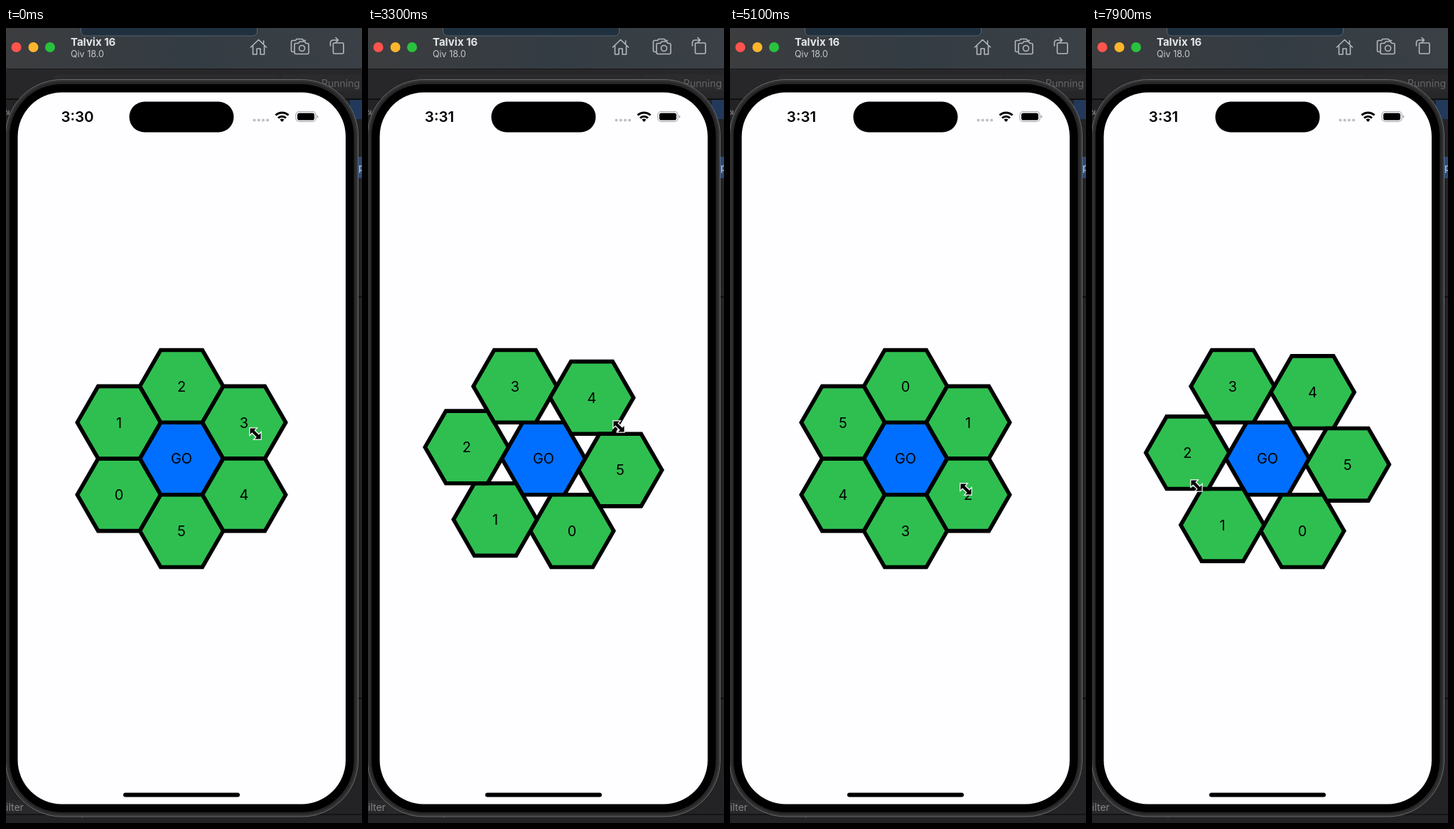
Recreate the animation shown at these times as an HTML page. Size 501 by 1117 pixels, loop 8 s.

```html
<!DOCTYPE html>
<html lang="en">
<head>
<meta charset="utf-8">
<title>Hexagon ring</title>
<style>
  html, body { margin: 0; width: 100%; height: 100%; overflow: hidden; background: #242426; }
  svg { display: block; width: 501px; height: 1117px; font-family: Inter, "Liberation Sans", sans-serif; }
  .hex path { stroke: #000; stroke-width: 5.6; fill: #2fbf50; }
  .hex text { font-size: 20px; text-anchor: middle; }
  .hex.go path { fill: #006fff; }
  .icon { fill: none; stroke: #b4b8bc; stroke-width: 1.6; stroke-linejoin: round; stroke-linecap: round; }
</style>
</head>
<body>
<svg viewBox="0 0 501 1117">
  <defs>
    <linearGradient id="bar">
      <stop offset="0" stop-color="#3c3d3f"/>
      <stop offset=".5" stop-color="#343c43"/>
      <stop offset="1" stop-color="#3a4045"/>
    </linearGradient>
  </defs>

  <!-- window behind the device -->
  <rect width="501" height="1117" fill="#232325"/>
  <rect y="57" width="501" height="43" fill="#272729"/>
  <rect x="68" y="65" width="317" height="24" rx="5" fill="#2b2b2d"/>
  <rect x="387" y="65" width="130" height="24" rx="5" fill="#2b2b2d"/>
  <rect y="99" width="501" height="2" fill="#101011"/>
  <rect x="484" y="101" width="17" height="27" fill="#22395c"/>
  <rect x="495" y="181" width="6" height="30" fill="#2b4a7a"/>
  <path d="M495 378h6M495 942h6M0 187h6M0 998h6" stroke="#0e0e0f" stroke-width="2"/>
  <path d="M-2 113l6 8M4 116v5h-5" class="icon" style="stroke:#6a6a6c"/>
  <rect y="1085" width="106" height="20" fill="#29292b"/>
  <path d="M0 1105h501" stroke="#151516" stroke-width="2"/>
  <path d="M107 1103v7" stroke="#3a3a3c" stroke-width="2"/>
  <g font-size="14" fill="#656567">
    <text x="444" y="82.500">Running A</text>
    <text x="0" y="1099.500" fill="#858587">ilter</text>
    <text x="496" y="201" fill="#c6cedb">p</text>
  </g>

  <!-- title bar -->
  <rect width="501" height="57" fill="url(#bar)"/>
  <path d="M0 57.500h501" stroke="#17181a"/>
  <path d="M105.500-1v5q0 7 7 7h234q7 0 7-7v-5z" fill="#20303f" stroke="#59636c"/>
  <circle cx="14.500" cy="27" r="7" fill="#ff544d"/>
  <circle cx="38.500" cy="27" r="7" fill="#fdb52c"/>
  <circle cx="62" cy="27" r="7" fill="#29c23e"/>
  <text x="91" y="24.500" font-size="15" font-weight="700" fill="#e4e6e8">Talvix 16</text>
  <text x="91" y="41" font-size="12.500" fill="#c3c7ca">Qiv 18.0</text>
  <g class="icon">
    <path d="M344.500 27l11-10.500 11 10.500M347.500 25v12h5.500v-8h5v8h5.500v-12M362.500 22v-4"/>
    <path d="M405 33.500h-1.500q-2 0-2-2v-12q0-2 2-2h4l1.500-2h8l1.500 2h3"/>
    <path d="M408 21.500h3.500l2-2.500h6.500l2 2.500h2q2 0 2 2v11q0 2-2 2h-16q-2 0-2-2v-11q0-2 2-2z"/>
    <circle cx="416.500" cy="28.500" r="4"/>
    <rect x="460.500" y="21" width="14.500" height="15" rx="1.500"/>
    <path d="M456.500 25v-4q0-4 4-4h6M464 13.500l3.500 3.500-3.500 3.500"/>
  </g>

  <!-- device -->
  <rect x="-.5" y="72.500" width="496" height="1035.500" rx="79" fill="#262627" stroke="#6e6f70"/>
  <rect x="1.500" y="74.500" width="492" height="1031.500" rx="77" fill="none" stroke="#343536" stroke-width="2"/>
  <rect x="5" y="79" width="484.500" height="1023" rx="73"/>
  <rect x="16.500" y="90.500" width="461.500" height="1000" rx="62" fill="#fefdff"/>
  <rect x="173.500" y="103.500" width="147" height="43" rx="21.500"/>
  <rect x="165" y="1074.500" width="164" height="6" rx="3"/>
  <text id="clock" x="100.500" y="132" font-size="20.500" font-weight="600" text-anchor="middle">3:30</text>
  <path d="M349.500 129.500h20" stroke="#c1c0c4" stroke-width="4.200" stroke-linecap="round" stroke-dasharray="0 6.200"/>
  <g fill="none" stroke="#000" stroke-width="3">
    <path d="M379.500 122.500a13 13 0 0 1 18 0M383 126.500a8 8 0 0 1 11 0"/>
  </g>
  <path d="M388.500 132l-3-3.200a4.500 4.500 0 0 1 6 0z"/>
  <rect x="408" y="117.500" width="28" height="14" rx="4.500" fill="none" stroke="#a4a3a7" stroke-width="1.200"/>
  <rect x="410" y="119.500" width="24" height="10" rx="2.800"/>
  <path d="M437.500 122.500q2 .5 2 2t-2 2z" fill="#a4a3a7"/>

  <g id="ring"></g>
  <path id="cursor" d="M-7.500-7.500H1L-1.700-4.800 4.800 1.700 7.500-1V7.500H-1L1.700 4.800-4.800-1.700-7.500 1z"
        stroke="#fff" stroke-width="2.400" paint-order="stroke"/>
</svg>
<script>
const LOOP = 8000, TICK = 100, TURN = 800;
const CX = 247, CY = 605, R = 58.67;
const rad = Math.PI / 180;
const byId = id => document.getElementById(id);
const lerp = (a, b, f) => a + (b - a) * f;
const clamp = x => Math.min(1, Math.max(0, x));
const ease = x => (1 - Math.cos(Math.PI * clamp(x))) / 2;

// A tap brings the tapped tile to the top: [start, slots counterclockwise]
const turns = [[1095, 1], [2982, 1], [4211, 2], [5761, -1], [7342, -2]];

// Pointer moves: [start, end, x, y]
const moves = [
  [0, 200, 353, 560],
  [3700, 4100, 332, 648],
  [5100, 5700, 165, 550],
  [6500, 7100, 147, 643]
];

const corner = (r, deg) => [r * Math.cos(deg * rad), -r * Math.sin(deg * rad)];
const outline = 'M' + [0, 60, 120, 180, 240, 300].map(a => corner(R, a)).join('L') + 'z';

function addHex(label, kind) {
  const g = document.createElementNS('http://www.w3.org/2000/svg', 'g');
  g.setAttribute('class', 'hex ' + kind);
  g.innerHTML = `<path d="${outline}"/><text y="7.3">${label}</text>`;
  byId('ring').append(g);
  return g;
}

const place = (el, x, y) => el.setAttribute('transform', `translate(${x} ${y})`);

// Tiles slide along a hexagon of radius 2R; slot 0 is the middle of its top edge
function ringPoint(slot) {
  const q = slot - 0.5, side = Math.floor(q);
  const a = corner(2 * R, 120 + 60 * side), b = corner(2 * R, 180 + 60 * side);
  return [CX + lerp(a[0], b[0], q - side), CY + lerp(a[1], b[1], q - side)];
}

place(addHex('GO', 'go'), CX, CY);
const tiles = [0, 1, 2, 3, 4, 5].map(n => addHex(n, 'tile'));

function draw(t) {
  const shift = turns.reduce((s, [start, n]) => s + n * ease((t - start) / TURN), 0);
  tiles.forEach((el, n) => place(el, ...ringPoint(2 - n + shift)));

  let x = 351, y = 570;
  for (const [start, end, tx, ty] of moves) {
    const f = ease((t - start) / (end - start));
    x = lerp(x, tx, f);
    y = lerp(y, ty, f);
  }
  place(byId('cursor'), x, y);
  byId('clock').textContent = t < 2200 ? '3:30' : '3:31';
}

const origin = performance.now();
function frame() {
  const t = (performance.now() - origin) % LOOP;
  draw(Math.floor(t / TICK) * TICK);
  requestAnimationFrame(frame);
}
frame();
</script>
</body>
</html>
```
